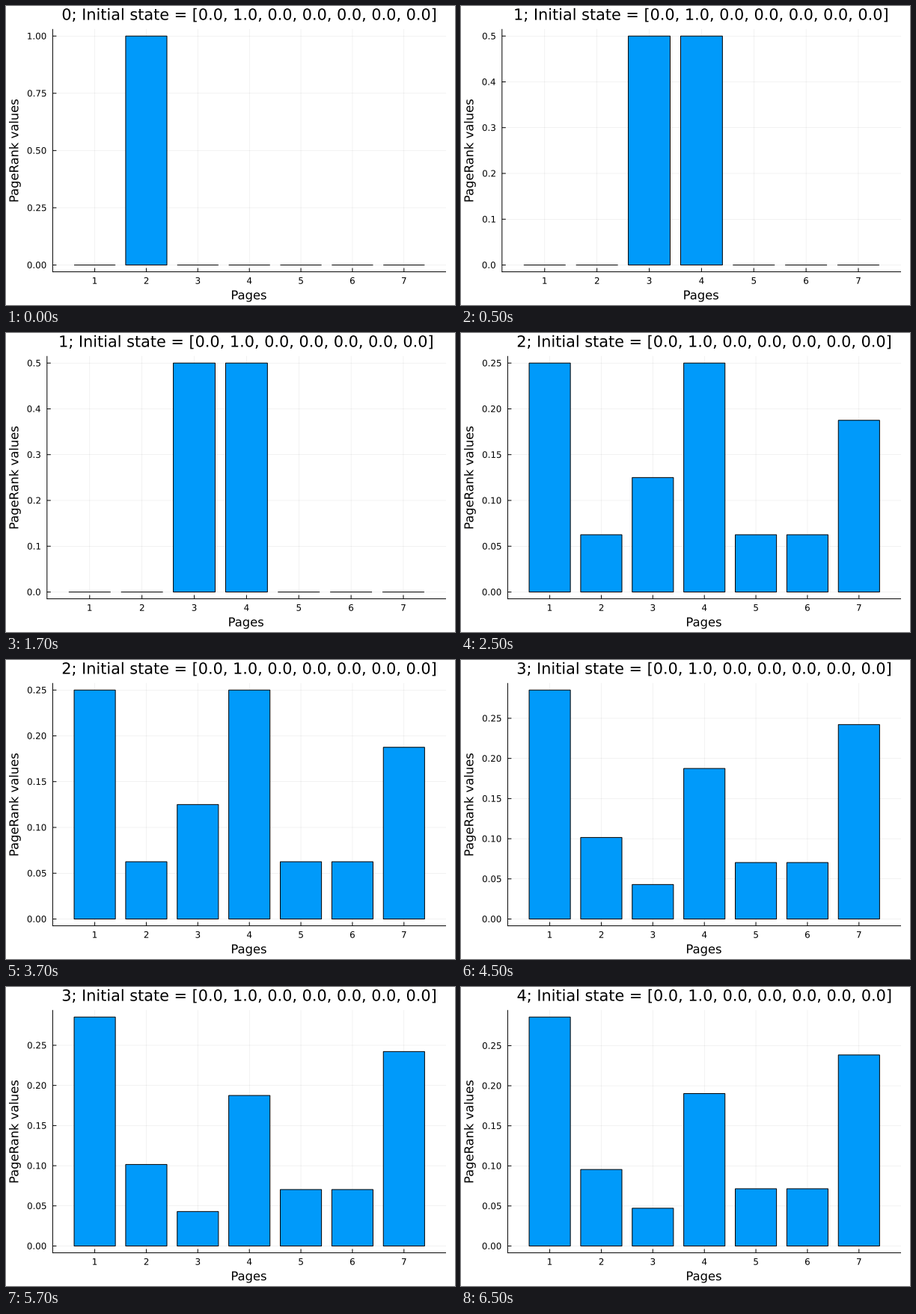
A matplotlib script for the animation above (8000 ms loop, 600 by 400 pixels).

```python
import numpy as np
import matplotlib.pyplot as plt
from matplotlib.animation import FuncAnimation
from matplotlib.patches import PathPatch, Rectangle
from matplotlib.path import Path
from matplotlib.textpath import TextPath
from matplotlib.transforms import Affine2D

WIDTH, HEIGHT, DPI = 600, 400, 100
PX = 72 / DPI
RIGHT, TOP, BOTTOM = 588, 30.8, 355.6
ZERO_Y, PEAK_Y = 346.5, 40.2
X_MIN, X_MAX = 0.184, 7.816
TITLE, LABEL, TICK = 20.8, 16.35, 11.88
BLUE = "#009afa"

# Rank of each page after every step, with the tick spacing and label decimals
STEPS = [
    (np.array([0, 1, 0, 0, 0, 0, 0]), 0.25, 2),
    (np.array([0, 0, 1, 1, 0, 0, 0]) / 2, 0.1, 1),
    (np.array([4, 1, 2, 4, 1, 1, 3]) / 16, 0.05, 2),
    (np.array([73, 26, 11, 48, 18, 18, 62]) / 256, 0.05, 2),
    (np.array([6, 2.005, 0.99, 3.995, 1.5, 1.5, 5.007]) / 21, 0.05, 2),
]

fig = plt.figure(figsize=(WIDTH / DPI, HEIGHT / DPI), dpi=DPI, facecolor="white")
ax = fig.add_axes([0, 0, 1, 1])


def text(x, y, string, size, align=0.5, angle=0):
    """Place text by its ink width; y is the baseline (x when rotated)."""
    glyphs = TextPath((0, 0), string, size=size, prop="DejaVu Sans")
    path = Path(glyphs.vertices, glyphs.codes)
    ink = path.get_extents()
    move = Affine2D().translate(-(ink.x0 + align * ink.width), 0)
    move.rotate_deg(angle).scale(1, -1).translate(x, y)
    ax.add_patch(PathPatch(move.transform_path(path), fc="black", lw=0, snap=False))


def line(xs, ys, alpha=1.0, width=1.0, z=3):
    ax.plot(xs, ys, color="black", alpha=alpha, lw=width * PX, zorder=z,
            snap=False, solid_capstyle="butt")


def grid(xs, ys):
    line(xs, ys, alpha=0.1, width=0.5, z=0)


def draw(i):
    step = (i + 3) // 4
    ranks, spacing, decimals = STEPS[step]
    left = 62.4 if decimals == 2 else 54.8
    peak = ranks.max()
    unit = (RIGHT - left) / (X_MAX - X_MIN)

    def to_x(value):
        return left + (value - X_MIN) * unit

    def to_y(value):
        return ZERO_Y - value / peak * (ZERO_Y - PEAK_Y)

    ax.clear()
    ax.set(xlim=(0, WIDTH), ylim=(HEIGHT, 0))
    ax.axis("off")

    for page, rank in enumerate(ranks, 1):
        x = to_x(page)
        grid([x, x], [TOP, BOTTOM])
        line([x, x], [BOTTOM, BOTTOM - 5])
        text(x, 371.7, str(page), TICK)
        x0, y = to_x(page - 0.4), to_y(rank)
        if rank:
            ax.add_patch(Rectangle((x0, y), 0.8 * unit, ZERO_Y - y, fc=BLUE,
                                   ec="black", lw=PX, zorder=2, snap=False))
        else:
            line([x0, x0 + 0.8 * unit], [ZERO_Y, ZERO_Y])

    for value in np.arange(0, peak + 1e-9, spacing):
        y = to_y(value)
        grid([left, RIGHT], [y, y])
        line([left, left + 5], [y, y])
        text(left - 8.9, y + 4.3, f"{value:.{decimals}f}", TICK, align=1)

    line([left, left], [TOP, BOTTOM + 0.5])
    line([left, RIGHT], [BOTTOM, BOTTOM])

    middle = (left + RIGHT) / 2 - 0.3
    state = [float(v) for v in STEPS[0][0]]
    text(middle, 18.6, f"{step}; Initial state = {state}", TITLE)
    text(middle, 392.4, "Pages", LABEL)
    text(16.4, (TOP + BOTTOM) / 2, "PageRank values", LABEL, angle=90)
    return []


anim = FuncAnimation(fig, draw, frames=16, interval=500, init_func=lambda: [],
                     repeat=True, repeat_delay=0, blit=False)
plt.show()
```
